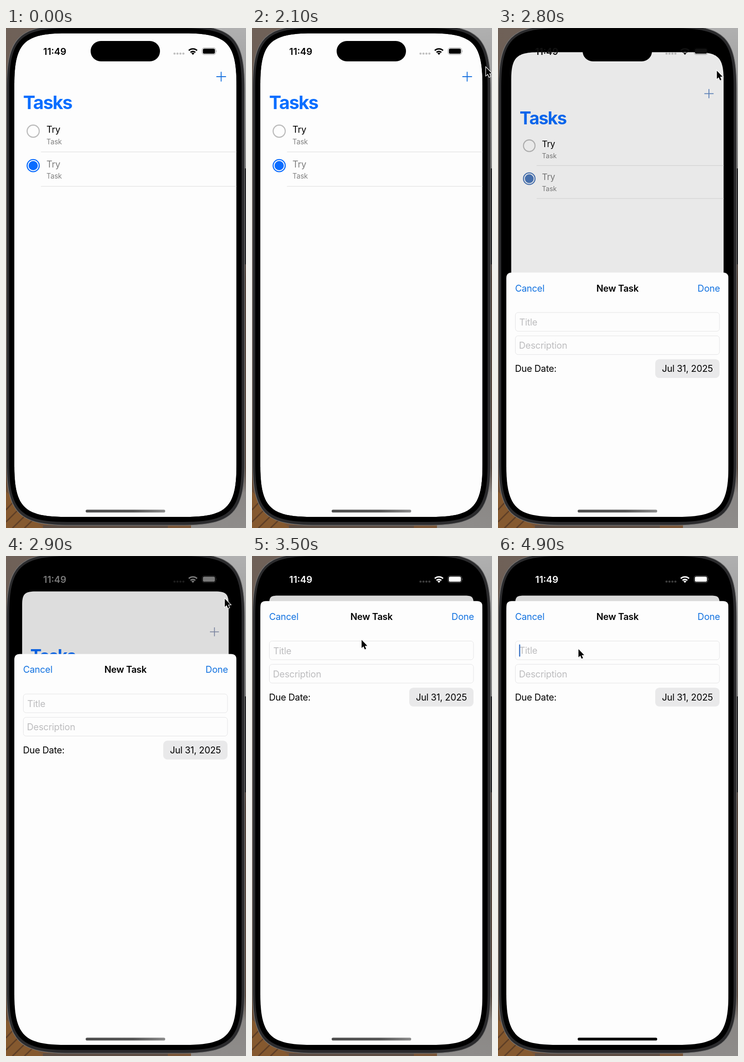
An HTML page for the animation above (5000 ms loop, 519x1079 px).

```html
<!DOCTYPE html>
<html lang="en">
<head>
<meta charset="utf-8">
<title>New task</title>
<style>
  html, body { margin: 0; width: 100%; height: 100%; overflow: hidden; background: #6b5a4f; }
  svg { display: block; width: 519px; height: 1079px; }
  text { font: 400 19.8px Inter, "Open Sans", sans-serif; letter-spacing: -0.012em; }
  .large { font-size: 39.6px; font-weight: 700; letter-spacing: -0.042em; fill: #0a6eff; }
  .bold { font-weight: 600; letter-spacing: -0.012em; }
  .time { font-size: 20.2px; font-weight: 600; letter-spacing: 0; }
  .note { font-size: 15.2px; letter-spacing: -0.005em; fill: #808080; }
  .link { fill: #1272e0; }
  .hint { fill: #bcbcbe; }
  .done { fill: #808080; }
  .line { stroke: #dcdcdc; }
  .field { fill: #fdfdfd; stroke: #e3e3e4; }
</style>
</head>
<body>
<svg viewBox="0 0 519 1079">
  <defs>
    <linearGradient id="wall" x1="0" y1="0" x2="0" y2="1">
      <stop offset="0" stop-color="#6f6158"/>
      <stop offset=".4" stop-color="#6a584c"/>
      <stop offset=".85" stop-color="#5f4635"/>
      <stop offset="1" stop-color="#7a5638"/>
    </linearGradient>
    <linearGradient id="side" x1="0" y1="0" x2="0" y2="1">
      <stop offset="0" stop-color="#b0b0b0"/>
      <stop offset=".27" stop-color="#858585"/>
      <stop offset=".5" stop-color="#4a3c34"/>
      <stop offset=".88" stop-color="#56463c"/>
      <stop offset=".93" stop-color="#8a8785"/>
      <stop offset="1" stop-color="#8e8c8a"/>
    </linearGradient>
    <linearGradient id="bar">
      <stop offset="0" stop-color="#4d4d4d"/>
      <stop offset=".6" stop-color="#555"/>
      <stop offset="1" stop-color="#8c8c8c"/>
    </linearGradient>
    <clipPath id="screen"><path id="screenShape"/></clipPath>
  </defs>

  <rect width="519" height="1079" fill="url(#wall)"/>
  <rect x="400" width="119" height="1079" fill="url(#side)"/>
  <path d="M0 1000L80 1079H0Z" fill="#85592f"/>
  <path d="M0 1040L22 1016M0 1066L36 1030M14 1079L50 1044M40 1079L62 1058" stroke="#5f3f26" stroke-width="3"/>
  <path d="M80 1073H350V1079H80Z" fill="#5d4e44"/>
  <rect x="516" y="303" width="3" height="207" fill="#202022"/>

  <path id="body" fill="#2b2b2d" stroke="#777" stroke-width="1.2"/>
  <path id="bezel"/>

  <g clip-path="url(#screen)">
    <rect width="519" height="1079"/>
    <g id="back">
      <path id="view" fill="#fdfdfd"/>
      <path id="plus" d="M454.9 105H475.8M465.3 94.6V115.4" stroke-width="1.9"/>
      <text class="large" x="37" y="174.6">Tasks</text>
      <circle cx="58.8" cy="222.6" r="13.1" fill="none" stroke="#bcbcbc" stroke-width="2.4"/>
      <text x="87.5" y="226.1">Try</text>
      <text class="note" x="87.6" y="250.6">Task</text>
      <path class="line" d="M75.5 267.4H499"/>
      <g id="check">
        <circle cx="58.8" cy="297" r="13.1" fill="none" stroke-width="2.4"/>
        <circle cx="58.8" cy="297" r="10" stroke="none"/>
      </g>
      <text class="done" x="87.5" y="300.5">Try</text>
      <text class="note" x="87.6" y="325">Task</text>
      <path class="line" d="M75.5 341.8H499"/>
      <path id="dim"/>
    </g>

    <g id="status">
      <text class="time" x="80.6" y="57.7">11:49</text>
      <g id="dots" opacity=".24"></g>
      <g fill="none" stroke="currentColor" stroke-width="3">
        <path d="M395.3 48.6A12.5 12.5 0 0 1 413.1 48.6"/>
        <path d="M399 52.6A7.4 7.4 0 0 1 409.4 52.6"/>
      </g>
      <path d="M404.2 58L400.9 54.6A4.7 4.7 0 0 1 407.5 54.6Z"/>
      <rect x="424" y="42.8" width="29.6" height="14.6" rx="4.6" fill="none" stroke="currentColor" opacity=".4"/>
      <rect x="425.8" y="44.6" width="26" height="11" rx="3.1"/>
      <path d="M454.8 47.8Q456.6 50.1 454.8 52.4Z" opacity=".45"/>
    </g>
    <rect x="183" y="28" width="150" height="44" rx="22"/>

    <g id="sheet">
      <path d="M18 1100V12Q18 0 30 0H486.4Q498.4 0 498.4 12V1100Z" fill="#fdfdfd"/>
      <text class="link" x="37" y="40.9">Cancel</text>
      <text class="bold" x="258.4" y="40.9" text-anchor="middle">New Task</text>
      <text class="link" x="480" y="40.9" text-anchor="end">Done</text>
      <rect class="field" x="37.5" y="86.3" width="441.5" height="40.4" rx="6"/>
      <text class="hint" x="46" y="114.3">Title</text>
      <rect class="field" x="37.5" y="136.6" width="441.5" height="40.4" rx="6"/>
      <text class="hint" x="45.3" y="164.6">Description</text>
      <text x="36.7" y="214.8">Due Date:</text>
      <rect x="340" y="187" width="139" height="40.6" rx="9" fill="#e9e9ea"/>
      <text x="409.6" y="214.8" text-anchor="middle">Jul 31, 2025</text>
      <rect id="caret" x="45.6" y="93.5" width="2.5" height="26.5" rx="1.2" fill="#3a72c4"/>
    </g>
    <rect id="home" x="172.3" y="1039.4" width="172" height="6.2" rx="3.1"/>
  </g>

  <g id="cursor">
    <path d="M1 2V19.5L5 16L7.7 22.3L10.6 21L8 15L13 14.7Z" opacity=".14"/>
    <path d="M0 0V17.5L4 14.1L6.8 20.6L9.8 19.3L7 13L12.3 12.7Z"
      stroke="#fff" stroke-width="2.4" paint-order="stroke"/>
  </g>
</svg>

<script>
const LOOP = 5000, STEP = 100;
const OPEN = 2698.6, RATE = 0.0182;
const FOCUS = 4500;
const LEFT = 18, RIGHT = 498.4, TOP = 11.4, BOTTOM = 1055, MID = (LEFT + RIGHT) / 2;
const RADIUS = 74;
const POINTER = [
  [2100, 506, 85], [2400, 474, 93], [3000, 473, 92],
  [3200, 425, 114], [3500, 237, 181], [3800, 174, 201]
];

const $ = id => document.getElementById(id);
const set = (id, name, value) => $(id).setAttribute(name, value);
const show = (id, on) => set(id, "visibility", on ? "visible" : "hidden");
const mix = (a, b, p) => a + (b - a) * p;
const blend = (a, b, p) => `rgb(${a.map((v, i) => Math.round(mix(v, b[i], p)))})`;
const clamp = v => Math.min(1, Math.max(0, v));

// Rounded box with continuous-curvature corners.
function squircle(x0, y0, x1, y1, r) {
  const e = r * 1.5, k = e * 0.19;
  return `M${x0} ${y0 + e}C${x0} ${y0 + k} ${x0 + k} ${y0} ${x0 + e} ${y0}` +
    `H${x1 - e}C${x1 - k} ${y0} ${x1} ${y0 + k} ${x1} ${y0 + e}` +
    `V${y1 - e}C${x1} ${y1 - k} ${x1 - k} ${y1} ${x1 - e} ${y1}` +
    `H${x0 + e}C${x0 + k} ${y1} ${x0} ${y1 - k} ${x0} ${y1 - e}Z`;
}

// Critically damped spring from 0 to 1.
function spring(ms) {
  const x = Math.max(0, ms) * RATE;
  return 1 - (1 + x) * Math.exp(-x);
}

function pointerAt(t) {
  const i = POINTER.findIndex(key => key[0] > t);
  if (i < 0) return POINTER[POINTER.length - 1].slice(1);
  const a = POINTER[Math.max(0, i - 1)], b = POINTER[i];
  const p = clamp((t - a[0]) / (b[0] - a[0] || 1));
  return [mix(a[1], b[1], p), mix(a[2], b[2], p)];
}

function draw(t) {
  const p = spring(t - OPEN);

  const scale = mix(1, 0.92, p);
  const shape = squircle(LEFT, TOP, RIGHT, BOTTOM, mix(RADIUS, 12, p) / scale);
  set("back", "transform",
    `translate(${MID} ${mix(TOP, 85.4, p)}) scale(${scale}) translate(${-MID} ${-TOP})`);
  set("view", "d", shape);
  set("dim", "d", shape);
  set("dim", "fill-opacity", 0.142 * p);
  const tint = blend([10, 108, 255], [128, 128, 128], p);
  set("check", "fill", tint);
  set("check", "stroke", tint);
  set("plus", "stroke", blend([22, 112, 222], [155, 155, 175], p));

  const u = clamp((t - 2750) / 310);
  const ink = blend([0, 0, 0], [255, 255, 255], u * u * (3 - 2 * u));
  set("status", "fill", ink);
  set("status", "color", ink);

  set("sheet", "transform", `translate(0 ${mix(BOTTOM, 97.2, p)})`);
  show("sheet", p > 0);
  set("caret", "opacity", t >= FOCUS ? 1 : 0);
  set("home", "fill", t >= FOCUS ? "#000" : "url(#bar)");

  show("cursor", t >= POINTER[0][0]);
  set("cursor", "transform", `translate(${pointerAt(t)})`);
}

set("screenShape", "d", squircle(LEFT, TOP, RIGHT, BOTTOM, RADIUS));
set("bezel", "d", squircle(7, 0.5, 509.5, 1066, RADIUS + 11));
set("body", "d", squircle(1.4, -5.5, 516, 1073.2, RADIUS + 17));
for (let i = 0; i < 4; i++) {
  const dot = document.createElementNS("http://www.w3.org/2000/svg", "circle");
  dot.setAttribute("cx", 364.4 + 6.4 * i);
  dot.setAttribute("cy", 55.3);
  dot.setAttribute("r", 2.3);
  $("dots").append(dot);
}

const start = performance.now();
function tick() {
  const t = (performance.now() - start) % LOOP;
  draw(Math.floor(t / STEP) * STEP);
  requestAnimationFrame(tick);
}
tick();
</script>
</body>
</html>
```
